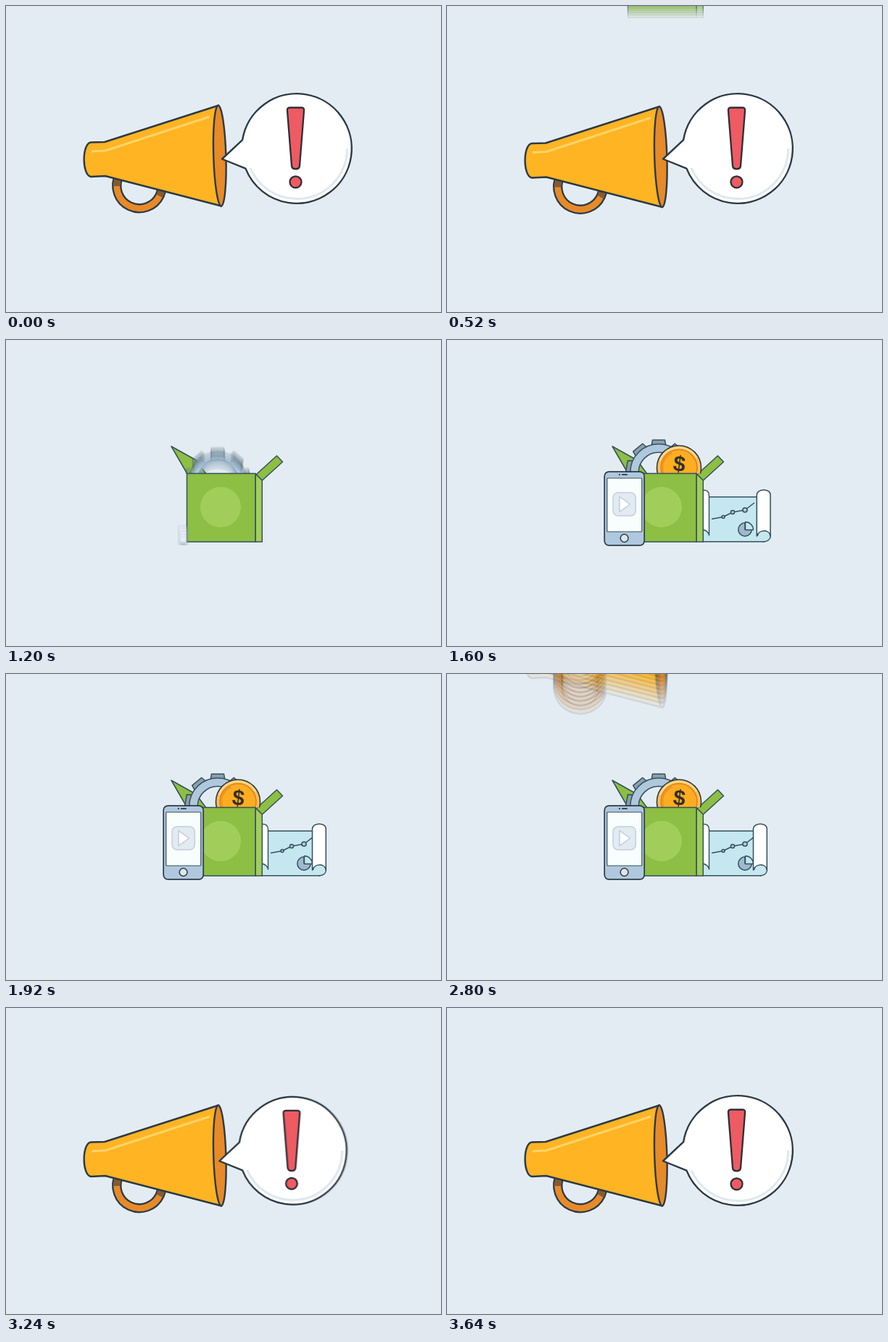
Animation of 600 by 423 pixels, one loop 3.68 s. Source, as an HTML page with a canvas:

```html
<!DOCTYPE html>
<html lang="en">
<head>
<meta charset="utf-8">
<title>Megaphone and box</title>
<style>
html, body { margin: 0; width: 100%; height: 100%; overflow: hidden; background: #e4ecf3; }
canvas { display: block; }
</style>
</head>
<body>
<canvas id="stage" width="600" height="423"></canvas>
<script>
const W = 600, H = 423, LOOP = 3680, STEP = 40;
const SHUTTER = 28, SAMPLES = 8;
const INK = '#2b3a45', LINE = '#35505c', GREEN = '#8cbf43', LIME = '#a1ce5b';
const ORANGE = '#e78a28', YELLOW = '#ffb424', STEEL = '#afc8de', PAPER = '#c5e7f0';

const view = document.getElementById('stage').getContext('2d');
const layer = document.createElement('canvas');
layer.width = W;
layer.height = H;
const c = layer.getContext('2d');

const prog = (t, a, b) => Math.min(1, Math.max(0, (t - a) / (b - a)));
const mix = (a, b, u) => a + (b - a) * u;
const outCubic = u => 1 - (1 - u) ** 3;
const smooth = u => u * u * (3 - 2 * u);
const outBack = (u, s = 1.7) => 1 + (s + 1) * (u - 1) ** 3 + s * (u - 1) ** 2;

function paint(fill, stroke, width) {
  if (fill) { c.fillStyle = fill; c.fill(); }
  if (stroke) { c.strokeStyle = stroke; c.lineWidth = width; c.stroke(); }
}

function poly(points, fill, stroke, width = 1.5, open = false) {
  c.beginPath();
  points.forEach(([x, y]) => c.lineTo(x, y));
  if (!open) c.closePath();
  paint(fill, stroke, width);
}

function disc(x, y, r, fill, stroke, width = 1.5) {
  c.beginPath();
  c.arc(x, y, r, 0, Math.PI * 2);
  paint(fill, stroke, width);
}

function slab(x, y, w, h, r, fill, stroke, width = 1.5) {
  c.beginPath();
  c.roundRect(x, y, w, h, r);
  paint(fill, stroke, width);
}

function arc(x, y, r, from, to, color, width) {
  const rad = Math.PI / 180;
  c.beginPath();
  c.arc(x, y, r, from * rad, to * rad);
  paint(null, color, width);
}

// Draws inside its own transform
function group(dx, dy, draw) {
  c.save();
  c.translate(dx, dy);
  draw();
  c.restore();
}

function scaleAt(x, y, s) {
  c.translate(x, y);
  c.scale(s, s);
  c.translate(-x, -y);
}

function megaphone() {
  arc(184, 248.5, 31.2, -20, 210, INK, 13.4);
  arc(184, 248.5, 31.2, -20, 210, ORANGE, 8.8);
  arc(184, 248.5, 31.2, 179, 210, '#855a30', 8.8);
  arc(184, 248.5, 31.2, -20, 27, '#855a30', 8.8);

  c.beginPath();
  c.moveTo(136, 188);
  c.lineTo(293, 137.5);
  c.lineTo(297, 276.5);
  c.lineTo(137, 235);
  c.lineTo(117, 236);
  c.bezierCurveTo(104.5, 234, 104.5, 190, 117, 188.5);
  c.closePath();
  paint(YELLOW, INK, 2.4);
  poly([[118, 201], [137, 200], [281, 153]], null, '#ffd466', 3, true);

  c.beginPath();
  c.ellipse(294.8, 207, 8.6, 69.6, -0.03, 0, Math.PI * 2);
  paint(ORANGE, INK, 2.4);
}

function bubble() {
  c.beginPath();
  c.arc(401, 197, 75.8, Math.PI * 1.05, Math.PI * 2.881);
  c.lineTo(298, 211.5);
  c.closePath();
  paint('#fff', INK, 2.4);
  arc(401, 197, 69.6, 0, 157, '#dfe8ee', 3);

  c.beginPath();
  c.moveTo(391, 140.5);
  c.lineTo(408, 140.5);
  c.quadraticCurveTo(411.5, 140.5, 411, 145);
  c.lineTo(405, 221);
  c.quadraticCurveTo(404.5, 225.3, 399.5, 225.3);
  c.quadraticCurveTo(394.5, 225.3, 394, 221);
  c.lineTo(388, 145);
  c.quadraticCurveTo(387.5, 140.5, 391, 140.5);
  c.closePath();
  paint('#ee5b62', '#2b2f38', 2.3);
  disc(399.5, 243.3, 8, '#ee5b62', '#2b2f38', 2.3);
}

function flaps(t) {
  const rise = outCubic(prog(t, 800, 890));
  const tilt = smooth(prog(t, 850, 1040));
  if (rise > 0) {
    const tip = [mix(241, 228, tilt), mix(185, mix(145, 147, tilt), rise)];
    const corner = [mix(267, 262, tilt), mix(185, mix(167, 166, tilt), rise)];
    poly([[250, 185], tip, corner, [mix(272, 276, tilt), 185]], GREEN, LINE);
    const dx = 28.5 * rise, dy = -26 * rise;
    poly([[345, 186], [345 + dx, 186 + dy], [353 + dx, 194.5 + dy], [353, 194.5]],
      tilt < 0.5 ? LIME : GREEN, LINE);
  }
}

function box() {
  poly([[344, 185], [353.3, 194], [353.3, 279], [344, 279]], LIME, LINE);
  poly([[249.5, 184.5], [344, 184.5], [344, 279], [249.5, 279]], GREEN, LINE);
  disc(296, 231, 28, LIME);
}

function gear() {
  for (let a = -170; a <= -10; a += 40) {
    c.save();
    c.translate(292, 183);
    c.rotate((a + 90) * Math.PI / 180);
    poly([[-10, -36], [-8.5, -44.8], [8.5, -44.8], [10, -36]], '#8c9fad', LINE);
    c.restore();
  }
  arc(292, 183, 33.5, 0, 360, LINE, 13);
  arc(292, 183, 33.5, 0, 360, STEEL, 10);
}

function coin() {
  disc(320, 176.5, 30.5, '#ffbe50', INK, 1.6);
  arc(320, 176.5, 28, 200, 330, '#ffdc94', 2);
  disc(320, 176.5, 25, '#ffad20', '#d9812b', 1.6);
  arc(320, 176.5, 23, 130, 245, '#ef9626', 3);
  c.save();
  c.translate(320.5, 172);
  c.rotate(0.12);
  c.fillStyle = '#33302c';
  c.font = 'bold 30px "Liberation Sans", sans-serif';
  c.textAlign = 'center';
  c.textBaseline = 'middle';
  c.fillText('$', 0, 1);
  c.restore();
}

function phone() {
  slab(217.2, 182.2, 55, 101.6, 6, STEEL, INK, 1.7);
  slab(220.8, 191, 48, 74, 1, '#f8fdfe', LINE, 1.2);
  disc(238, 186.2, 1.1, INK);
  slab(241, 185.3, 8, 1.8, 0.9, INK);
  disc(244.6, 274, 5.4, '#e0e5ea', INK, 1.5);
  slab(229, 211, 31.3, 32, 7, '#e2eaf2', '#c3d0de', 1.5);
  poly([[238, 216.5], [252.5, 227], [238, 237.5]], '#fff', '#bccbd9', 1.4);
}

function chart(right) {
  poly([[353, 217], [right - 9, 217], [right - 9, 278.7], [353, 278.7]], PAPER, LINE);
  c.save();
  c.beginPath();
  c.rect(353, 200, Math.max(0, right - 372), 90);
  c.clip();
  poly([[365, 247.5], [381, 244.5], [394, 238], [411, 235], [424, 225]], null, LINE, 1.5, true);
  disc(381, 244.5, 2, STEEL, LINE);
  disc(394, 238, 2.6, STEEL, LINE);
  disc(411, 235, 3.1, STEEL, LINE);
  c.beginPath();
  c.moveTo(411, 262);
  c.arc(411, 262, 9.2, 0, Math.PI * 1.5);
  c.closePath();
  paint('#9db9cb', LINE, 1.5);
  c.beginPath();
  c.moveTo(411.5, 262.5);
  c.arc(411.5, 262.5, 11, -Math.PI / 2, 0);
  c.closePath();
  paint(PAPER, LINE, 1.4);
  c.restore();

  // Left curl
  c.beginPath();
  c.moveTo(353, 207.5);
  c.quadraticCurveTo(361.5, 207, 361.5, 215);
  c.lineTo(361.5, 270);
  c.quadraticCurveTo(360.5, 264, 353, 262);
  c.closePath();
  paint('#fff', LINE, 1.4);

  // Right roll
  c.beginPath();
  c.ellipse(right - 9.5, 271, 9, 7.8, 0, 0, Math.PI * 2);
  paint(PAPER, LINE, 1.4);
  c.fillStyle = PAPER;
  c.fillRect(right - 19, 271, 9, 7);
  c.beginPath();
  c.moveTo(right - 19.5, 271);
  c.lineTo(right - 19.5, 214);
  c.bezierCurveTo(right - 19, 205, right - 0.7, 205, right - 0.7, 214);
  c.lineTo(right - 0.7, 271);
  c.bezierCurveTo(right - 2, 261, right - 17, 262, right - 19.5, 271);
  c.closePath();
  paint('#fff', LINE, 1.5);
}

function boxSet(t) {
  const size = 1 - prog(t, 2825, 2925) ** 2;
  if (t < 485 || size <= 0) return;
  const fall = 312 * prog(t, 490, 690) ** 1.6 - 10;
  const y = t < 690 ? fall - 279 : 23 * (1 - outBack(prog(t, 690, 830), 1));

  group(0, y, () => {
    scaleAt(300, 279, size);
    const unroll = prog(t, 1340, 1640);
    if (unroll > 0) {
      const settle = smooth(prog(t, 1610, 1920));
      chart(mix(364, 447, outCubic(unroll)) - 5 * settle);
    }
    flaps(t);
    c.save();
    c.beginPath();
    c.rect(230, 80, 140, 104.5);
    c.clip();
    const rise = (a, b) => 60 * (1 - outBack(prog(t, a, b)));
    if (t > 1140) {
      group(0, rise(1140, 1420), gear);
      group(0, rise(1230, 1510), coin);
    }
    c.restore();
    box();
    if (t > 1190) {
      c.save();
      scaleAt(244.6, 283, outBack(prog(t, 1190, 1460), 0.6));
      phone();
      c.restore();
    }
  });
}

// Megaphone and bubble part sideways as the box drops in
function leave(t) {
  const away = prog(t, 585, 770) ** 1.7;
  if (away === 1) return;
  group(-330 * away, 1.5 * smooth(prog(t, 0, 520)), () => {
    c.translate(200, 210);
    c.rotate(-0.15 * away);
    c.translate(-200, -210);
    megaphone();
  });
  group(320 * away, 0, bubble);
}

// Megaphone falls in, then the bubble springs out of its mouth
function enter(t) {
  if (t < 2740) return;
  const drop = mix(-330, -3, prog(t, 2740, 2920) ** 1.3);
  const bounce = 9 * Math.sin(Math.PI * prog(t, 2920, 3070));
  group(0, drop - bounce, megaphone);
  if (t <= 3050) return;

  const age = t - 3170;
  const pop = smooth(prog(t, 3050, 3150));
  const decay = Math.exp(-age / 250) * (1 - prog(t, 3170, 3640));
  const sway = 1.3 * (age < 0 ? prog(t, 3110, 3170) : Math.cos(Math.PI * age / 80) * decay);
  group(5 * sway, 0, () => {
    scaleAt(298, 211, pop * (1 + 0.025 * sway));
    bubble();
  });
}

function scene(t) {
  c.fillStyle = '#e4ecf3';
  c.fillRect(0, 0, W, H);
  boxSet(t);
  leave(t);
  enter(t);
}

// Averages several moments to give fast parts a motion blur
function frame(now) {
  const t = Math.floor((now % LOOP) / STEP) * STEP;
  for (let i = 0; i < SAMPLES; i++) {
    const shift = ((i + 0.5) / SAMPLES - 0.5) * SHUTTER;
    scene(Math.max(0, t + shift));
    view.globalAlpha = 1 / (i + 1);
    view.drawImage(layer, 0, 0);
  }
}

c.lineJoin = 'round';
let start = null;
function tick(now) {
  if (start === null) start = now;
  frame(now - start);
  requestAnimationFrame(tick);
}
frame(0);
requestAnimationFrame(tick);
</script>
</body>
</html>
```
